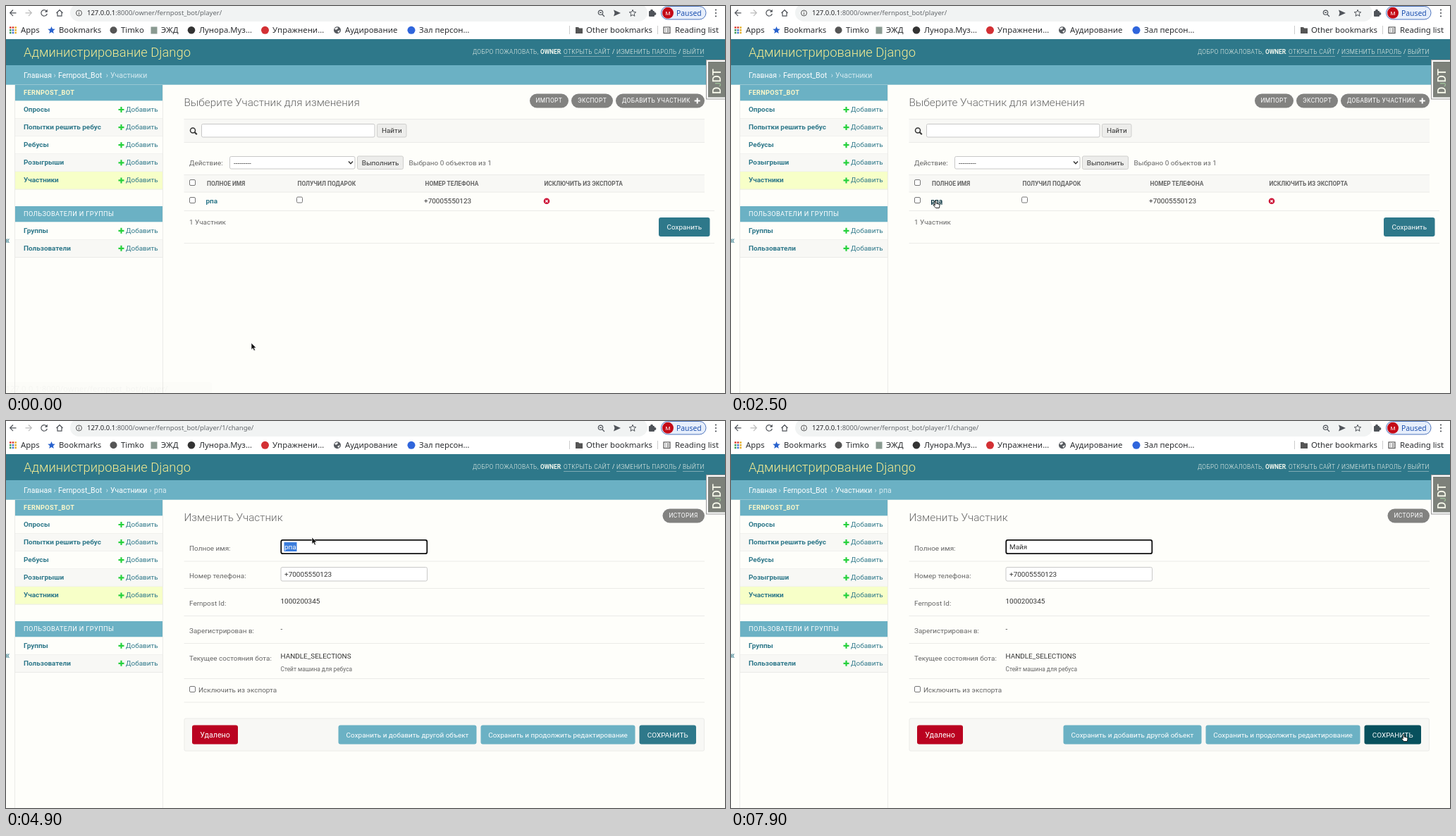
Recreate the animation shown at these times as an HTML page. Size 1020 px wide and 549 px high, loop 8 s.

```html
<!DOCTYPE html>
<html lang="ru">
<head>
<meta charset="utf-8">
<style>
html, body { margin: 0; width: 100%; height: 100%; overflow: hidden; background: #fefefa; }
svg { display: block; width: 100%; height: 100%; }
text { font-family: Roboto, sans-serif; white-space: pre; }
.ui { font-family: "Noto Sans", sans-serif; }
</style>
</head>
<body>
<svg id="stage" viewBox="0 0 1020 549"></svg>
<script>
const TEAL = '#2e788a', SKY = '#6bb1c4', INK = '#333', GREY = '#666', LINE = '#ebebe8', PALE = '#f8f8f5', DARK = '#08323f';
const HOST = '127.0.0.1', PATH = ':8000/owner/fernpost_bot/player/';
const OLD_NAME = 'рпа', NEW_NAME = 'Майя', PHONE = '+70005550123';

const text = (x, y, s, fill = INK, size = 9.95, extra = '') =>
  `<text x="${x}" y="${y}" fill="${fill}" font-size="${size}" ${extra}>${s}</text>`;
const bold = 'font-weight="700"', light = 'font-weight="300"', spaced = 'letter-spacing=".38"';
const middle = 'text-anchor="middle"';
const ui = (x, s) => text(x, 38.2, s, '#2b2d30', 11.35, 'class="ui"');
const rect = (x, y, w, h, fill, r = 0, extra = '') =>
  `<rect x="${x}" y="${y}" width="${w}" height="${h}" rx="${r}" fill="${fill}" ${extra}/>`;
const circle = (x, y, r, fill, extra = '') => `<circle cx="${x}" cy="${y}" r="${r}" fill="${fill}" ${extra}/>`;
const path = (d, fill, stroke = 'none', width = 1, extra = '') =>
  `<path d="${d}" fill="${fill}" stroke="${stroke}" stroke-width="${width}" ${extra}/>`;
const stroke = (d, color = '#50545a', width = 1.2) => path(d, 'none', color, width);
const hline = (x1, x2, y, color = LINE) => stroke(`M${x1} ${y}H${x2}`, color, 1);
const field = (x, y, w, h, color = '#c8c8c8') => rect(x, y, w, h, '#fff', 2, `stroke="${color}"`);
const checkbox = (x, y) => rect(x, y, 8, 8, '#fff', 1.5, 'stroke="#777"');
const plus = (x, y, color, r = 4, w = 2.2) => stroke(`M${x - r} ${y}h${2 * r}M${x} ${y - r}v${2 * r}`, color, w);
const group = (id, body, extra = '') => `<g id="${id}" ${extra}>${body}</g>`;
const button = (x, y, w, h, label, fill, size = 9.95, id = '') =>
  rect(x, y, w, h, fill, 3, id && `id="${id}"`) + text(x + w / 2, y + h / 2 + 3.5, label, '#fff', size, middle);
const pill = (x, w, label, tx) => rect(x, 124.5, w, 20, '#828280', 10) + text(tx, 137.3, label, '#fff', 8.4, spaced);
const greyButton = (x, y, w, label) =>
  rect(x, y, w, 18.5, '#ededeb', 2, 'stroke="#cfcfcd"') + text(x + w / 2, y + 12.9, label, INK, 9.95, middle);

function star(x, y, r) {
  let d = '';
  for (let i = 0; i < 10; i++) {
    const a = i * Math.PI / 5, k = i % 2 ? r * .45 : r;
    d += (i ? 'L' : 'M') + (x + k * Math.sin(a)) + ' ' + (y - k * Math.cos(a));
  }
  return d + 'Z';
}

function browserBar() {
  let s = rect(0, 0, 1020, 47, '#fff') + rect(91, -3, 819, 25, '#f1f3f3', 12.5);
  s += stroke('M14.5 9.8H6M10 5.5L5.7 9.8L10 14.1');
  s += stroke('M27.500 9.800H36M32 5.500L36.300 9.800L32 14.100', '#bbb');
  s += stroke('M57.300 7A4.300 4.300 0 1 0 58.300 11') + path('M58.800 4.800V8.800H54.800Z', '#50545a');
  s += stroke('M71.500 10L76 5.700L80.500 10M73 9V14.200H79V9');
  s += circle(103.500, 10, 4, 'none', 'stroke="#555"') + stroke('M103.500 9.500v3M103.500 7.500v1', '#555', 1);
  s += text(115, 13.4, `<tspan fill="#202124">${HOST}</tspan><tspan id="url"></tspan>`, '#63676b', 9.47, 'class="ui"');
  s += circle(843.500, 9.300, 3.200, 'none', 'stroke="#50545a" stroke-width="1.200"') + stroke('M846 12L849 15M842 9.300h3');
  s += path('M862 5.500L872 10L862 14.500L863.500 10Z', '#50545a');
  s += stroke(star(889, 10.300, 5), '#50545a', 1);
  s += rect(912, 7, 8, 8, '#50545a', 1) + circle(916, 6.800, 2, '#50545a') + circle(920.500, 11, 1.900, '#50545a');
  s += rect(929.500, .500, 63.500, 18.500, '#e6eefb', 9.200, 'stroke="#4d74bd"') + circle(939, 9.800, 8, '#c40a17');
  s += text(939, 12.800, 'М', '#fff', 8, middle) + text(951, 13.500, 'Paused', '#1b4fae', 10.400, 'class="ui"');
  for (const y of [5.5, 10, 14.5]) s += circle(1007, y, 1.1, '#50545a');

  const dots = ['#d93b2f', '#d93b2f', '#e4ae25', '#3b9b55', '#3e72d6', '#e4ae25', '#3b9b55', '#3e72d6', '#e4ae25'];
  dots.forEach((c, i) => s += rect(5 + i % 3 * 3.7, 29.3 + Math.floor(i / 3) * 3.7, 2.5, 2.5, c));
  s += ui(21, 'Apps') + path(star(64.5, 34.5, 5.5), '#2862ce') + ui(75, 'Bookmarks');
  s += circle(152.500, 34.300, 5, '#555') + ui(163, 'Timko');
  s += rect(205.500, 29.500, 9, 10, '#8a9a91') + ui(220, 'ЭЖД');
  s += circle(263, 34.300, 5.300, '#333') + ui(274, 'Лунора.Муз…');
  s += circle(367.500, 34.300, 5.500, '#d33034') + ui(378, 'Упражнени…');
  s += circle(470, 34.300, 5, '#55595e') + path('M466 32l4-2 1 2-3 2zM470 36l4-2-2 4z', '#fff') + ui(481, 'Аудирование');
  s += circle(575, 34.300, 5.500, '#2f65dc') + ui(586, 'Зал персон…');
  s += stroke('M799.500 28V40M924.500 28V40', '#ccc', 1);
  s += path('M808 30h4l1.300 1.500H818V39H808Z', '#555') + ui(823, 'Other bookmarks');
  s += rect(933, 30, 9, 8.500, 'none', 0, 'stroke="#555" stroke-width="1.200"') + stroke('M935 32.500h1M937.500 32.500h3M935 34.500h1M937.500 34.500h3M935 36.500h1M937.500 36.500h3', '#555', .9);
  return s + ui(949, 'Reading list');
}

function header() {
  let s = rect(0, 47, 1020, 37, TEAL) + rect(0, 84, 1020, 27.7, SKY);
  s += text(25, 71.500, 'Администрирование Django', '#f4ec92', 18.36, light);
  const tool = (x, label, extra = spaced) => text(x, 68.3, label, '#f2f7ee', 8.4, extra);
  s += tool(662, 'ДОБРО ПОЖАЛОВАТЬ,', light + ' ' + spaced) + tool(758, 'OWNER', bold) + tool(786, '.');
  s += tool(791, 'ОТКРЫТЬ САЙТ', light + ' ' + spaced) + tool(860, '/') + tool(866, 'ИЗМЕНИТЬ ПАРОЛЬ', light + ' ' + spaced);
  s += tool(954, '/') + tool(960, 'ВЫЙТИ', light + ' ' + spaced);
  s += hline(791, 857, 71.5, '#7fabb4') + hline(866, 951, 71.5, '#7fabb4') + hline(960, 990, 71.5, '#7fabb4');
  const crumb = (x, label, fill = '#fff') => text(x, 101.5, label, fill, 10.5);
  s += crumb(25, 'Главная') + crumb(67.5, '›', '#d5eaf0') + crumb(74, 'Fernpost_Bot') + crumb(141.7, '›', '#d5eaf0');
  s += group('crumbList', crumb(148, 'Участники', '#d5eaf0'));
  return s + group('crumbEdit', crumb(148, 'Участники') + crumb(203.5, '›', '#d5eaf0') + crumb(210, OLD_NAME, '#d5eaf0'));
}

function sidebar() {
  const section = (y, label, extra, fill) => rect(13, y, 209, 22.5, SKY) + text(25, y + 14, label, fill, 9.18, extra + ' ' + spaced);
  const row = (y, label, fill, id = '') => rect(13, y, 209, 25.2, fill) + hline(13, 222, y + 25, LINE) +
    text(25, y + 15.3, label, TEAL, 9.95, bold + (id && ` id="${id}"`)) + plus(163.5, y + 12.3, '#25d13c') + text(170, y + 15.3, 'Добавить', TEAL);
  let s = stroke('M12.500 112V549M222.500 112V549', LINE, 1) + text(-1.500, 337, '«', TEAL, 15);
  s += section(112, 'FERNPOST_BOT', bold, '#fbf7c9');
  ['Опросы', 'Попытки решить ребус', 'Ребусы', 'Розыгрыши'].forEach((label, i) =>
    s += row(134.7 + i * 25.1, label, i % 2 ? PALE : '#fefefa'));
  s += row(235.1, 'Участники', '#f7ffc8', 'members');
  s += section(284, 'ПОЛЬЗОВАТЕЛИ И ГРУППЫ', '', '#fff');
  return s + row(306.5, 'Группы', '#fefefa') + row(331.5, 'Пользователи', PALE);
}

function listPage() {
  let s = text(252.500, 141.600, 'Выберите Участник для изменения', GREY, 15.3, light);
  s += pill(743, 55, 'ИМПОРТ', 751.5) + pill(802, 59, 'ЭКСПОРТ', 811) + pill(865, 126, 'ДОБАВИТЬ УЧАСТНИК', 874) + plus(980.7, 134.4, '#fff', 4, 2);
  s += rect(252.500, 160.500, 738.500, 33, PALE) + hline(252.5, 991, 160.5) + hline(252.5, 991, 193.5);
  s += circle(265, 176.500, 3.500, 'none', 'stroke="#333" stroke-width="1.500"') + stroke('M267.500 179L270.800 182.300', '#333', 2);
  s += field(277.500, 167.500, 245.500, 18.500) + group('searchFocus', rect(278, 167.5, 245, 18.5, '#fff', 2, 'stroke="#111" stroke-width="1.700"'));
  s += stroke('M282.500 171.500V183', '#111', .9).replace('<path', '<path id="searchCaret"') + greyButton(526.5, 167.5, 41.5, 'Найти');
  s += text(260, 225.500, 'Действие:', GREY) + field(317.5, 213.5, 177.5, 17.5) + text(323, 225.5, '---------');
  s += stroke('M486 220.500L489 223.800L492 220.500', '#333', 1.4) + greyButton(498.5, 213, 65, 'Выполнить');
  s += text(571.500, 225.500, 'Выбрано 0 объектов из 1', GREY);
  s += rect(252.500, 239, 738.500, 25, PALE) + hline(252.5, 991, 239.5) + hline(252.5, 991, 264) + hline(252.5, 1005, 290.5) + hline(252.5, 1005, 336.5);
  const heads = [[285, 'ПОЛНОЕ ИМЯ'], [413.5, 'ПОЛУЧИЛ ПОДАРОК'], [594.5, 'НОМЕР ТЕЛЕФОНА'], [763.5, 'ИСКЛЮЧИТЬ ИЗ ЭКСПОРТА']];
  for (const [x, label] of heads) s += text(x, 254.700, label, GREY, 8.4, bold);
  s += checkbox(260.500, 246.500) + checkbox(260.5, 271.5) + checkbox(412.5, 271);
  s += text(283.500, 279.500, OLD_NAME, TEAL, 9.95, bold + ' id="player"') + text(593, 279.5, PHONE);
  s += circle(767, 276.800, 4.300, '#cc1234') + stroke('M765.300 275.100l3.400 3.400M768.700 275.100l-3.400 3.400', '#fff', 1.3);
  return s + text(260, 309.5, '1 Участник', GREY) + button(926, 300, 72.5, 27, 'Сохранить', TEAL);
}

function editPage() {
  let s = text(252.500, 141.600, 'Изменить Участник', GREY, 15.3, light) + pill(931.5, 59.5, 'ИСТОРИЯ', 940.5);
  const rows = [[184, 'Полное имя:'], [222.5, 'Номер телефона:'], [261.5, 'Fernpost Id:'], [300.5, 'Зарегистрирован в:'], [339.5, 'Текущее состояния бота:']];
  for (const [y, label] of rows) s += text(260, y, label, GREY);
  for (const y of [199, 237.5, 276.5, 315.5, 365.5, 399]) s += hline(252.5, 991, y);
  s += field(390, 168.500, 207.500, 20) + field(390, 207.5, 207.5, 19.5);
  s += group('nameFocus', rect(390.3, 168.8, 207, 19.4, '#fff', 2.5, 'stroke="#111" stroke-width="1.800"'));
  s += rect(394.500, 172, 18, 13, '#3b7ddd', 0, 'id="selection"') + text(395, 181.8, '', INK, 9.95, 'id="name"');
  s += rect(420.300, 172.500, .9, 12, '#111', 0, 'id="nameCaret"');
  s += text(395, 220.500, PHONE) + text(389.5, 259.3, '1000200345') + text(389.5, 298, '-');
  s += text(389.500, 337.300, 'HANDLE_SELECTIONS') + text(389.5, 355.3, 'Стейт машина для ребуса', GREY, 8.4);
  s += checkbox(260.500, 376.500) + text(273, 384.5, 'Исключить из экспорта', GREY);
  s += rect(253, 422, 737.500, 46, PALE, 2, `stroke="${LINE}"`) + button(264, 431.5, 65, 27, 'Удалено', '#ba0220', 10.7);
  s += button(471.500, 431.500, 196, 27, 'Сохранить и добавить другой объект', SKY);
  s += button(673.500, 431.500, 219, 27, 'Сохранить и продолжить редактирование', SKY);
  return s + button(898.5, 431.5, 80.5, 27, 'СОХРАНИТЬ', TEAL, 9.95, 'save');
}

const debugHandle = rect(993.5, 76.5, 32, 55.5, '#fff', 0, 'stroke="#999"') + rect(996, 79, 30, 50.5, '#7d817a') +
  `<g transform="translate(1013.500 125) rotate(-90)">${text(0, 0, 'D<tspan font-size="11" fill="#9fc29a">J</tspan>DT', '#f6f8ea', 16, 'font-weight="500"')}</g>`;

const cursors = group('cursor',
  group('arrow', path('M0 0V9.500L2.200 7.500L3.800 11L5.500 10.200L4 6.900H7Z', '#111', '#fff', .6)) +
  group('hand', path('M2.300 .8Q3.200 -.3 4 .8V4L8 5Q9.200 5.500 9 7L8.300 10.500H3.500L.4 7Q0 5.700 1.300 6L2.300 6.800Z', '#fff', '#111', .9)) +
  group('beam', stroke('M-2 -5H2M0 -5V5M-2 5H2', '#222', 1)));

const stage = document.getElementById('stage');
stage.innerHTML = rect(0, 0, 1020, 549, '#fefefa') + browserBar() + header() + sidebar() +
  group('listPage', listPage()) + group('editPage', editPage()) + debugHandle +
  group('status', rect(-4, 534, 296, 19, '#dadddc', 3, 'stroke="#c6c9c8" stroke-width=".6"') +
    text(-.5, 546.8, '', '#3c4043', 11.4, 'class="ui" id="statusText"')) + cursors;

const el = id => document.getElementById(id);
const show = (id, on) => el(id).setAttribute('display', on ? 'inline' : 'none');
const paint = (id, color) => el(id).setAttribute('fill', color);
const within = (t, a, b) => t >= a && t < b;
const blink = (t, start) => Math.floor((t - start) / 600) % 2 === 0;

// Cursor stops: time, x, y
const route = [[100, 348, 478], [1000, 57, 248], [1500, 57, 248], [2300, 287, 276], [2600, 287, 276], [2700, 289, 278],
  [2900, 289, 278], [3700, 432, 176], [3900, 432, 174], [4200, 434, 165], [6400, 434, 165], [6600, 235, 290],
  [6900, 728, 442], [7000, 728, 442], [7100, 790, 411], [7200, 884, 428], [7300, 962, 461], [7400, 962, 461], [7800, 951, 444], [8000, 951, 444]];

function cursorAt(t) {
  const i = route.findIndex(stop => stop[0] >= t);
  if (i < 1) return route[0].slice(1);
  const [t0, x0, y0] = route[i - 1], [t1, x1, y1] = route[i];
  const p = (t - t0) / (t1 - t0), k = p * p * (3 - 2 * p);
  return [x0 + (x1 - x0) * k, y0 + (y1 - y0) * k];
}

function draw(now) {
  const t = Math.floor(now % 8000 / 100) * 100;
  const editing = t >= 2700, ghost = t < 1100;
  show('listPage', !editing);
  show('crumbList', !editing);
  show('editPage', editing);
  show('crumbEdit', editing);
  el('url').textContent = PATH + (editing ? '1/change/' : '');

  paint('members', within(t, 900, 1700) ? DARK : TEAL);
  const onPlayer = within(t, 2200, 2700);
  paint('player', onPlayer ? DARK : TEAL);
  el('player').setAttribute('text-decoration', onPlayer ? 'underline' : 'none');
  const searching = within(t, 1100, 2500);
  show('searchFocus', searching);
  show('searchCaret', searching && blink(t, 1100));

  const typed = t < 5400 ? OLD_NAME : NEW_NAME.slice(0, t < 5600 ? 1 : t < 5700 ? 3 : 4);
  const selected = within(t, 3700, 5400);
  el('name').textContent = typed;
  paint('name', selected ? '#fff' : INK);
  show('nameFocus', t >= 3700);
  show('selection', selected);
  show('nameCaret', t >= 5400 && blink(t, t < 5700 ? 5400 : 5700));
  if (t >= 5400) el('nameCaret').setAttribute('x', 395 + el('name').getComputedTextLength());
  paint('save', t >= 7800 ? '#07505d' : t >= 7200 ? '#226773' : TEAL);

  show('status', ghost || within(t, 1300, 1700) || within(t, 2600, 3000));
  el('status').setAttribute('opacity', ghost ? .04 : 1);
  el('statusText').textContent = HOST + PATH + (t >= 2600 ? '1/change/' : '');

  const hand = within(t, 900, 1700) || onPlayer || t >= 7300;
  const beam = within(t, 3700, 4100);
  show('hand', hand);
  show('beam', beam);
  show('arrow', !hand && !beam);
  el('cursor').setAttribute('transform', `translate(${cursorAt(t)})`);
}

const start = performance.now();
function frame() {
  draw(performance.now() - start);
  requestAnimationFrame(frame);
}
frame();
</script>
</body>
</html>
```
